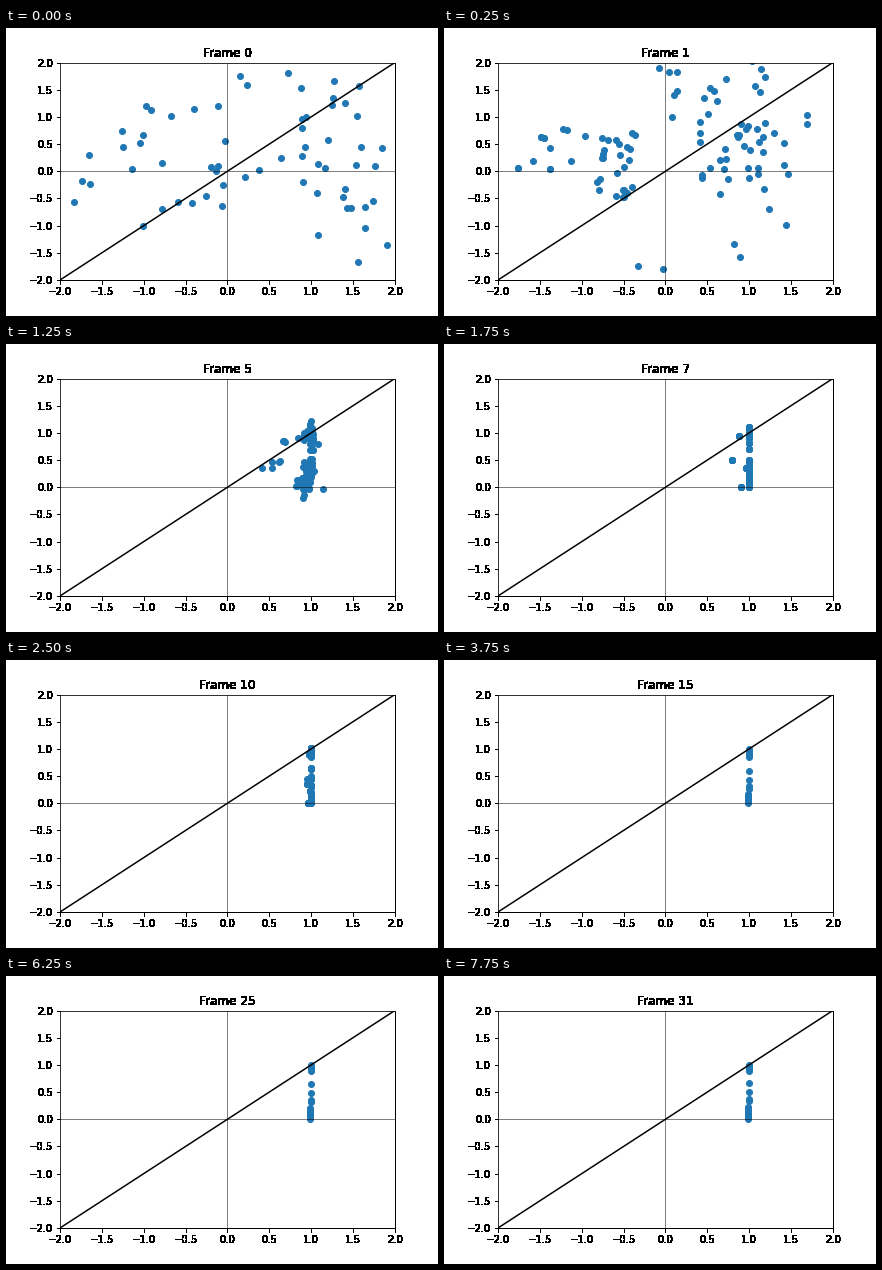
A matplotlib script for the animation above (8 s loop, 432x288 px).

```python
import numpy as np
import matplotlib.pyplot as plt
from matplotlib.animation import FuncAnimation

FRAMES, INTERVAL = 32, 250
COUNT = 100
rng = np.random.default_rng(4)


def cloud(*boxes):
    """Scatter points evenly in boxes of (count, x range, y range)."""
    return np.vstack([np.column_stack([rng.uniform(*xs, k), rng.uniform(*ys, k)])
                      for k, xs, ys in boxes])


def ranked(points, cuts):
    """Repeat points up to COUNT, group them by x and sort each group by y."""
    points = np.resize(points, (COUNT, 2))
    points = points[np.argsort(points[:, 0], kind="stable")]
    return np.vstack([g[np.argsort(g[:, 1], kind="stable")]
                      for g in np.split(points, cuts)])


def tween(a, b, t, cuts=()):
    a, b = ranked(a, list(cuts)), ranked(b, list(cuts))
    return a + (b - a) * t


def settle(step, steps, keep):
    """Ease out: each step leaves the share `keep` of the way to go."""
    return (1 - keep ** step) / (1 - keep ** steps)


# The swarm starts wide, then gathers around the segment x = 1, 0 <= y <= 1.
start = cloud((26, (-2, 0), (-1.1, 1.3)),
              (6, (-.1, .8), (-1.4, 1.9)),
              (31, (.8, 2), (-1.7, 1.9)))

spread = cloud((9, (-1.85, -1.1), (0, .8)),
               (27, (-1, -.35), (-.5, .7)),
               (6, (-.15, .2), (0, 2)),
               (4, (-.5, 1.1), (-1.9, -1.2)),
               (18, (.3, .75), (-.5, 1.7)),
               (18, (.85, 1.2), (-.4, 1)),
               (6, (.9, 1.2), (1.4, 2.1)),
               (8, (1.2, 1.7), (-1, 1.2)))

gather = np.vstack([
    [(-1.11, -.22), (-.56, -.27), (-.53, .34), (1.71, -.12),
     (1.43, .66), (1.01, 1.69), (.9, -1.03), (.97, -.71)],
    cloud((5, (-.25, 0), (.3, .6)),
          (9, (.1, .55), (-.1, .2)),
          (9, (.55, .8), (.4, .95)),
          (24, (.7, 1.05), (-.12, .3)),
          (28, (.9, 1.05), (.3, .9)),
          (8, (1.05, 1.18), (.2, 1)),
          (6, (.85, 1.05), (.9, 1.4)),
          (3, (.9, 1), (-.5, -.1)))])

rungs = np.r_[np.linspace(0, .3, 9), .38, .44, .5, .7, .82,
              np.linspace(.9, 1.1, 6)]
column = np.vstack([[(.8, .5), (.88, .94), (.9, 0), (.96, .36)],
                    np.column_stack([np.ones_like(rungs), rungs])])

levels = np.r_[np.linspace(.002, .17, 7), .27, .31, .43, .6,
               np.linspace(.86, .995, 5)]


def drift(steps):
    """Logistic creep along x = 1 from y = 0 towards y = 1."""
    y = 1 / (1 + (1 / levels - 1) * np.exp(-.02 * steps))
    return np.column_stack([1 - .008 * (y < .25), y])


def positions(n):
    if n == 0:
        return start
    if n < 3:
        return tween(spread, gather, settle(n - 1, 2, .67),
                     range(12, COUNT, 12))
    if n < 7:
        return tween(gather, column, settle(n - 3, 4, .5), [8])
    if n < 15:
        return tween(column, drift(0), settle(n - 7, 8, .65))
    return drift(n - 15)


def harden(img, dpi):
    """Make every touched pixel fully opaque."""
    img[..., 3] = img[..., 3] > 0
    return img, 0, 0


fig, ax = plt.subplots(figsize=(6, 4), dpi=72)
fig.subplots_adjust(left=.125, right=.9, bottom=.125, top=.88)
ax.set(xlim=(-2, 2), ylim=(-2, 2))
ticks = np.arange(-2, 2.1, .5)
ax.set_xticks(ticks)
ax.set_yticks(ticks)

ax.axhline(0, color="black", lw=.5)
ax.axvline(0, color="black", lw=.5)
ax.plot([-2, 2], [-2, 2], color="black", lw=1.5)
dots = ax.scatter([], [], s=36, color="C0")
title = ax.set_title("Frame 0")

crisp = [title, ax.spines["right"], ax.spines["bottom"]]
for axis in (ax.xaxis, ax.yaxis):
    for tick in axis.get_major_ticks():
        crisp += [tick.label1, tick.tick1line]
for artist in crisp:
    artist.set_agg_filter(harden)


def update(n):
    dots.set_offsets(positions(n))
    title.set_text(f"Frame {n}")
    return dots, title


anim = FuncAnimation(fig, update, frames=FRAMES, interval=INTERVAL,
                     repeat=True, repeat_delay=0)
plt.show()
```
